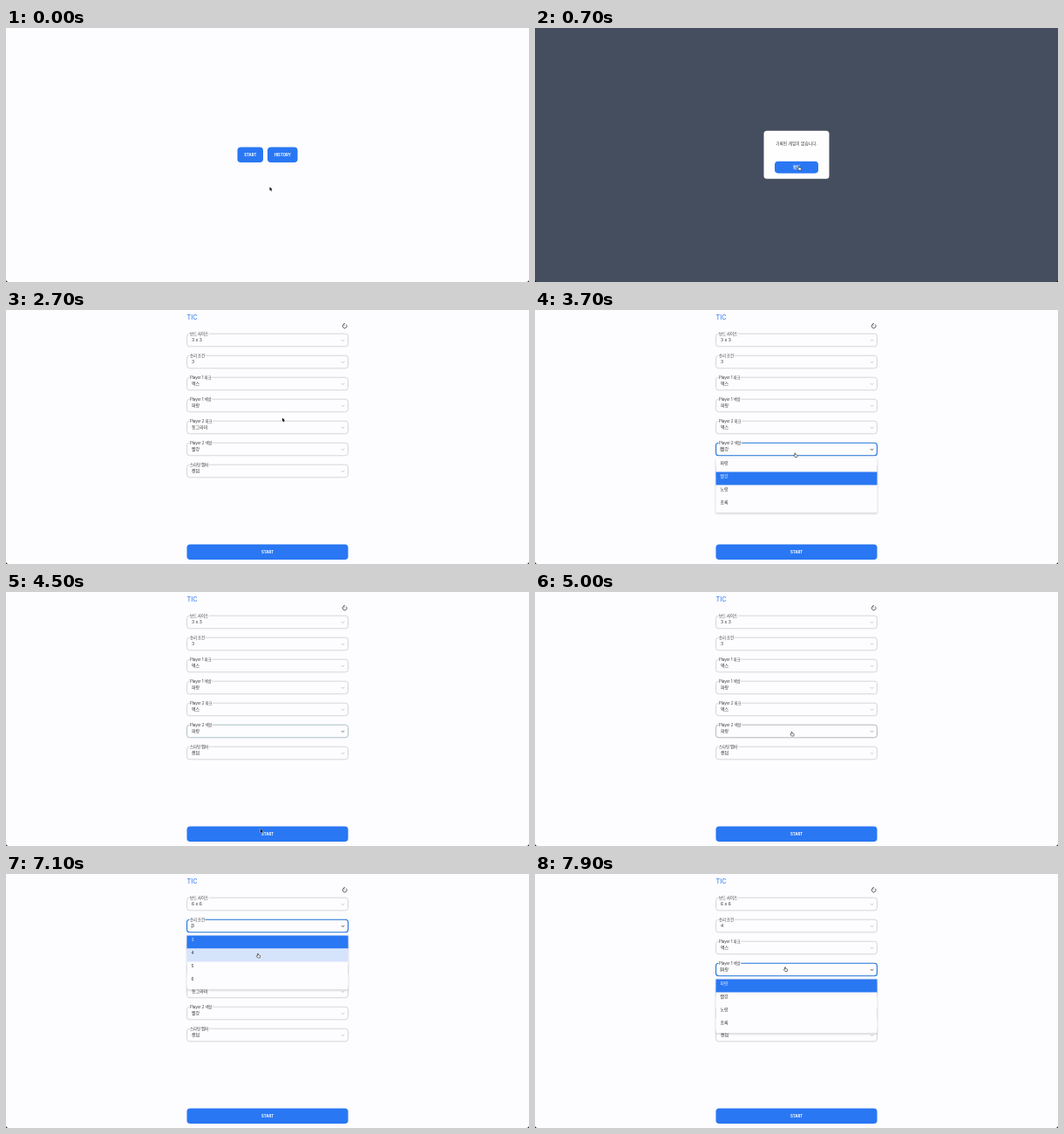
Animation of 600 by 291 pixels, one loop 8 s. Source, as an HTML page:

```html
<!DOCTYPE html>
<html lang="ko">
<head>
<meta charset="utf-8">
<title>TIC</title>
<style>
  html, body { margin: 0; width: 100%; height: 100%; overflow: hidden; background: #fdfcfe; }
  svg { display: block; width: 100vw; height: 100vh; }
  text { font-family: Inter, "Noto Sans CJK KR", "Noto Sans CJK", sans-serif; fill: #333; white-space: pre; }
  .btn { font-size: 4.3px; font-weight: 700; fill: #fff; text-anchor: middle; }
  .label { font-size: 4.3px; stroke: #fdfcfe; stroke-width: 2px; paint-order: stroke; }
  .value { font-size: 5px; }
  .menu { filter: drop-shadow(0 1px 1px rgba(0, 0, 0, .22)); }
</style>
</head>
<body>
<svg id="stage" viewBox="0 0 600 291" preserveAspectRatio="none"></svg>
<script>
const LOOP = 8000, STEP = 100;
const BLUE = '#2977f3', BG = '#fdfcfe';
const stage = document.getElementById('stage');

const marks = ['엑스', '동그라미', '세모', '네모'];
const colors = ['파랑', '빨강', '노랑', '초록'];
const sizes = Array.from({ length: 6 }, (_, i) => `${i + 3} x ${i + 3}`);
const fields = [
  ['보드 사이즈', sizes],
  ['승리 조건', sizes.slice(0, 4).map(s => s[0])],
  ['Player 1 마크', marks],
  ['Player 1 색상', colors],
  ['Player 2 마크', marks],
  ['Player 2 색상', colors],
  ['스타팅 멤버', ['랜덤', 'Player 1', 'Player 2']]
];
const defaults = ['3 x 3', '3', '엑스', '파랑', '동그라미', '빨강', '랜덤'];

// pointer stops: arrive and leave in steps, then x, y
const stops = [
  [0, 0, 302.5, 182],
  [3, 6, 317, 144],
  [7, 8, 303, 158],
  [11, 14, 281, 144],
  [22, 23, 327, 93],
  [24, 26, 320, 121],
  [27, 27, 317, 123.5],
  [29, 29, 306, 133],
  [34, 34, 300, 153],
  [36, 36, 299, 158],
  [39, 40, 297, 175],
  [44, 46, 292, 271.5],
  [49, 52, 294.5, 160],
  [56, 57, 388, 17],
  [61, 61, 297, 34],
  [63, 64, 294.5, 91],
  [67, 68, 291, 57],
  [71, 75, 289, 91],
  [77, 80, 287, 106.5]
];

const opens = i => ({ open: i, focus: i });
const picks = (i, value) => ({ open: -1, pick: [i, value] });
const events = {
  400: { modal: '기록된 게임이 없습니다.' },
  800: { modal: '' },
  1200: { page: 'form' },
  2900: opens(4),
  3300: picks(4, '엑스'),
  3600: opens(5),
  4000: picks(5, '파랑'),
  4500: { focus: -1, fade: 5 },
  4600: { modal: '플레이어 정보가 같습니다.', fade: -1 },
  5000: { modal: '' },
  5700: { values: defaults },
  6100: opens(0),
  6400: picks(0, '6 x 6'),
  6800: opens(1),
  7200: picks(1, '4'),
  7800: opens(3)
};

function stateAt(t) {
  const s = { page: 'home', modal: '', open: -1, focus: -1, fade: -1, values: defaults };
  for (const at in events) {
    if (at > t) break;
    const { pick, ...rest } = events[at];
    Object.assign(s, rest);
    if (pick) s.values = s.values.with(...pick);
  }
  return s;
}

function pointerAt(t) {
  const n = t / STEP, i = stops.findLastIndex(p => p[0] <= n);
  const [, leave, x, y] = stops[i], next = stops[i + 1];
  if (!next || n <= leave) return { x, y };
  const k = (n - leave) / (next[0] - leave);
  return { x: x + (next[2] - x) * k, y: y + (next[3] - y) * k };
}

const inside = (p, x, y, w, h) => p.x > x && p.x < x + w && p.y > y && p.y < y + h;
const fieldTop = i => 27 + 25 * i;
const overField = (p, i) => inside(p, 207, fieldTop(i), 186, 15);

function isHand(s, p) {
  if (s.modal) return inside(p, 275, 153, 50, 13);
  if (s.page === 'home') return inside(p, 265, 137, 30, 17) || inside(p, 300, 137, 34, 17);
  if (s.open >= 0 && inside(p, 207, fieldTop(s.open) + 18, 186, 15 * fields[s.open][1].length)) return true;
  return inside(p, 384, 13, 9, 9) || fields.some((_, i) => overField(p, i));
}

const rect = (x, y, w, h, r, fill, more = '') =>
  `<rect x="${x}" y="${y}" width="${w}" height="${h}" rx="${r}" fill="${fill}" ${more}/>`;
const text = (x, y, str, cls, more = '') =>
  `<text x="${x}" y="${y}" class="${cls}" ${more}>${str}</text>`;
const button = (x, y, w, h, str) =>
  rect(x, y, w, h, 3.8, BLUE) + text(x + w / 2, y + h / 2 + 1.6, str, 'btn');

const home = () => button(265.5, 136.5, 29.5, 17.5, 'START') + button(300, 136.5, 34.5, 17.5, 'HISTORY');

function field(i, s, p) {
  const y = fieldTop(i), active = s.focus === i;
  const over = s.open < 0 && overField(p, i);
  const [line, arrow] = active ? ['#1f74d6', '#333']
    : s.fade === i ? ['#86aaae', '#555']
    : over ? ['#999', '#999'] : ['#c4c4c6', '#bbb'];
  return rect(207.6, y + .2, 184.8, 14.6, 3, BG, `stroke="${line}" stroke-width="${active ? 1.1 : .7}"`) +
    text(211, y + 1.5, fields[i][0], 'label') +
    text(213, y + 9.2, s.values[i], 'value') +
    (s.open === i ? rect(212.8, y + 4.6, .5, 5.6, 0, '#333') : '') +
    `<path d="M385 ${y + 7}l1.6 1.5 1.6-1.5" fill="none" stroke="${arrow}" stroke-width=".8"/>`;
}

function menu(i, s, p) {
  const y = fieldTop(i) + 18.5, options = fields[i][1];
  const rows = options.map((name, n) => {
    const top = y + 15 * n, chosen = s.values[i] === name;
    const fill = chosen ? BLUE : inside(p, 207, top, 186, 15) ? '#d6e4fb' : 'none';
    return rect(207.5, top, 185, 15, 0, fill) +
      text(212.5, top + 6.8, name, 'value', chosen ? 'style="fill:#e4eeff"' : '');
  });
  return rect(207.5, y - .8, 185, 15 * options.length + 2.6, 1, BG, 'class="menu"') + rows.join('');
}

const resetIcon = `<path d="M387.3 16.4A2.4 2.4 0 1 0 390.2 16.6M388.9 15.3l-1.8.9 1.2 1.5"
  fill="none" stroke="#333" stroke-width=".75"/>`;

const form = (s, p) =>
  text(207.6, 10.9, 'TIC', '', `font-size="7.4" style="fill:${BLUE}"`) + resetIcon +
  fields.map((_, i) => field(i, s, p)).join('') +
  button(207.5, 268.5, 185, 17.5, 'START') +
  (s.open < 0 ? '' : menu(s.open, s, p));

const modal = str =>
  rect(0, 0, 600, 291, 0, '#454e5f') +
  rect(262.5, 117.8, 75, 55, 3.5, '#fefefe') +
  text(300, 134, str, '', 'font-size="4.75" text-anchor="middle"') +
  button(275, 152.8, 50, 13.6, '확인');

function pointer({ x, y }, hand) {
  const d = hand
    ? 'M-.5 2.6V.4Q0-.3.5.4V1.9L2.2 2.4Q2.8 2.6 2.7 3.2L2.3 5H-.2L-1.7 3Q-1.5 2.1-.5 2.8Z'
    : 'M0 0V4.3L1 3.4 1.7 5 2.5 4.6 1.8 3.1H3.1Z';
  const paint = hand
    ? 'fill="#fff" stroke="#222" stroke-width=".6"'
    : 'fill="#111" stroke="#fff" stroke-width=".5" paint-order="stroke"';
  return `<path transform="translate(${x} ${y})" d="${d}" ${paint}/>`;
}

const corners = '<path d="M0 288Q0 291 3 291H0ZM600 288Q600 291 597 291H600Z" fill="#111"/>';

function draw(t) {
  const s = stateAt(t), p = pointerAt(t);
  stage.innerHTML = rect(0, 0, 600, 291, 0, BG) +
    (s.modal ? modal(s.modal) : s.page === 'home' ? home() : form(s, p)) +
    corners + pointer(p, isHand(s, p));
}

const began = performance.now();
let shown = -1;
function tick() {
  const t = Math.floor((performance.now() - began) % LOOP / STEP) * STEP;
  if (t !== shown) draw(shown = t);
  requestAnimationFrame(tick);
}
tick();
</script>
</body>
</html>
```
